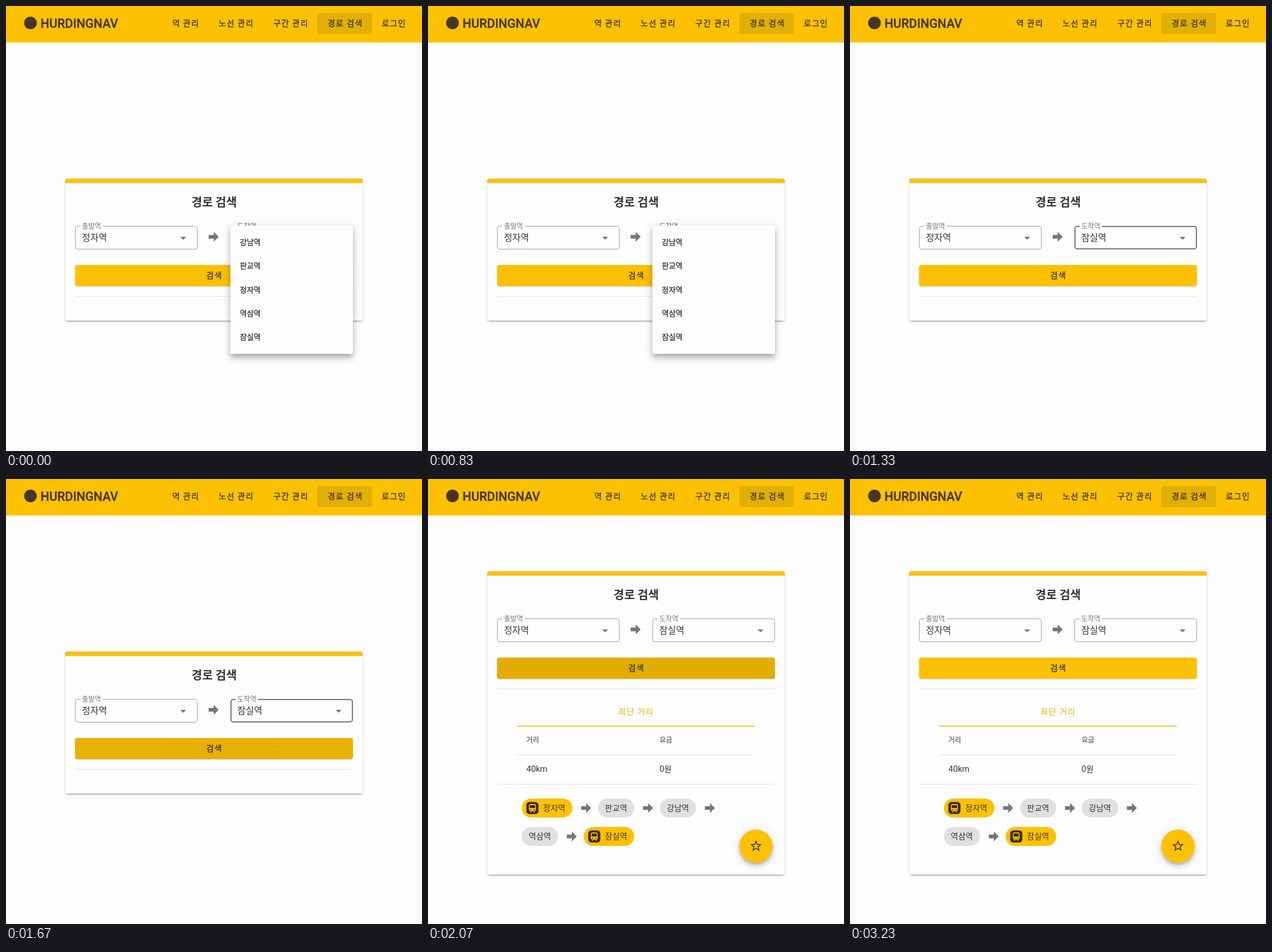
An HTML page with a canvas that plays this animation: 723 px wide and 775 px high, repeating every 3260 ms.

```html
<!DOCTYPE html>
<html lang="ko">
<head>
<meta charset="utf-8">
<title>경로 검색</title>
<style>
  html, body { margin: 0; width: 100%; height: 100%; overflow: hidden; background: #fdfdfd; }
  canvas { display: block; width: 723px; height: 775px; }
</style>
</head>
<body>
<canvas id="stage"></canvas>
<script>
const W = 723, H = 775, LOOP = 3260;
const AMBER = '#fcc102', DARK = '#463720', INK = '#333', GREY = '#777', PAPER = '#fdfdfd';
const FONT = 'Roboto, "Noto Sans CJK KR", "Noto Sans CJK", sans-serif';

// moments of the interaction, in ms
const PICK = 945, HOVER = 1370, PRESS = 1645, RESULT = 1860, LEAVE = 2320;

const canvas = document.getElementById('stage');
const ctx = canvas.getContext('2d');
const dpr = window.devicePixelRatio || 1;
canvas.width = W * dpr;
canvas.height = H * dpr;

const arrowIcon = new Path2D('M4,15V9H12V4.16L19.84,12L12,19.84V15H4Z');
const caretIcon = new Path2D('M7,10L12,15L17,10Z');
const starIcon = new Path2D('M12,15.39L8.24,17.66L9.23,13.38L5.91,10.5L10.29,10.13L12,6.09L13.71,10.13L18.09,10.5L14.77,13.38L15.76,17.66M22,9.24L14.81,8.63L12,2L9.19,8.63L2,9.24L7.45,13.97L5.82,21L12,17.27L18.18,21L16.54,13.97L22,9.24Z');

const clamp = v => Math.max(0, Math.min(1, v));
const ramp = (t, start, length) => clamp((t - start) / length);

// cubic-bezier(.25, .8, .5, 1)
function ease(x) {
  let lo = 0, hi = 1;
  for (let i = 0; i < 20; i++) {
    const s = (lo + hi) / 2, r = 1 - s;
    if (0.75 * r * r * s + 1.5 * r * s * s + s ** 3 < x) lo = s; else hi = s;
  }
  const r = 1 - lo;
  return 2.4 * r * r * lo + 3 * r * lo * lo + lo ** 3;
}

function box(x, y, w, h, r, fill) {
  ctx.beginPath();
  ctx.roundRect(x, y, w, h, r);
  ctx.fillStyle = fill;
  ctx.fill();
}

function disc(x, y, r, fill) {
  ctx.beginPath();
  ctx.arc(x, y, r, 0, Math.PI * 2);
  ctx.fillStyle = fill;
  ctx.fill();
}

// medium weight is thickened by a hairline, as Hangul has only regular and bold
function text(str, x, midY, size, color, weight = 400, spacing = 0) {
  const y = midY + size * 0.365;
  ctx.font = `${weight} ${size}px ${FONT}`;
  ctx.letterSpacing = spacing + 'px';
  ctx.fillStyle = ctx.strokeStyle = color;
  ctx.fillText(str, x, y);
  if (weight === 500) {
    ctx.lineWidth = 0.35;
    ctx.strokeText(str, x, y);
  }
}

function icon(path, cx, cy, color, scale = 1, angle = 0) {
  ctx.save();
  ctx.translate(cx, cy);
  ctx.rotate(angle);
  ctx.scale(scale, scale);
  ctx.translate(-12, -12);
  ctx.fillStyle = color;
  ctx.fill(path);
  ctx.restore();
}

// drop shadow outside a rounded box; layers are [dy, blur, spread, alpha]
function shadow(x, y, w, h, r, layers) {
  ctx.save();
  ctx.beginPath();
  ctx.rect(0, 0, W, H);
  ctx.roundRect(x, y, w, h, r);
  ctx.clip('evenodd');
  for (const [dy, blur, spread, alpha] of layers) {
    ctx.shadowColor = `rgba(0,0,0,${alpha})`;
    ctx.shadowBlur = blur * dpr;
    ctx.shadowOffsetX = 2000 * dpr;
    ctx.shadowOffsetY = dy * dpr;
    box(x - spread - 2000, y - spread, w + 2 * spread, h + 2 * spread, r, '#000');
  }
  ctx.restore();
}

const FAINT = [[1, 2, 0, 0.14]];
const LOW = [[3, 1, -2, 0.2], [2, 2, 0, 0.14], [1, 5, 0, 0.12]];
const MID = [[3, 5, -1, 0.2], [6, 10, 0, 0.14], [1, 18, 0, 0.12]];
const HIGH = [[5, 5, -3, 0.2], [8, 10, 1, 0.14], [3, 14, 2, 0.12]];

function header() {
  box(0, 0, W, 63.5, 0, AMBER);
  disc(42.5, 29.5, 11, DARK);
  text('HURDINGNAV', 60, 29.7, 21.4, DARK, 500);
  box(541, 12, 95, 37, 4, '#e2af04');
  const items = [['역 관리', 289], ['노선 관리', 369.5], ['구간 관리', 464.5], ['경로 검색', 559], ['로그인', 653]];
  for (const [label, x] of items) text(label, x, 29.5, 14, DARK, 500, 1.25);
}

function field(x, label, value, focused, angle) {
  const inset = focused ? 1 : 0.5;
  ctx.beginPath();
  ctx.roundRect(x + inset, 383 + inset, 213 - 2 * inset, 41 - 2 * inset, 4);
  ctx.strokeStyle = focused ? GREY : '#9e9e9e';
  ctx.lineWidth = 2 * inset;
  ctx.stroke();
  box(x + 9, 381, 39, 6, 0, PAPER);
  text(label, x + 12, 383.3, 12, GREY);
  text(value, x + 12, 403.2, 15.8, INK);
  icon(caretIcon, x + 188, 404, GREY, 1, angle);
}

function searchButton(t) {
  const shade = 0.08 * ramp(t, HOVER, 200) + 0.02 * ramp(t, PRESS + 80, 200);
  const out = 1 - ease(ramp(t, LEAVE, 200));
  shadow(120, 451, 483, 37, 4, FAINT);
  box(120, 451, 483, 37, 4, AMBER);
  box(120, 451, 483, 37, 4, `rgba(0,0,0,${shade * out})`);
  const ripple = ramp(t, PRESS, 260);
  if (ripple > 0 && t < PRESS + 400) {
    ctx.save();
    ctx.beginPath();
    ctx.roundRect(120, 451, 483, 37, 4);
    ctx.clip();
    const alpha = 0.05 * ripple * (1 - ramp(t, PRESS + 200, 200));
    disc(370, 470, 40 + 215 * ease(ripple), `rgba(66,52,32,${alpha})`);
    ctx.restore();
  }
  text('검색', 348, 469.2, 14, DARK, 500, 1.25);
}

function chip(x, y, label, terminal) {
  box(x, y, terminal ? 88 : 63, 33, 16.5, terminal ? AMBER : '#e0e0e0');
  text(label, x + (terminal ? 37 : 12), y + 16.2, 14, terminal ? DARK : INK);
  if (!terminal) return;
  const brown = '#38290f';
  box(x + 8, y + 6, 21, 21, 5.5, brown);
  box(x + 12.5, y + 9.5, 12, 12.5, 3, AMBER);
  box(x + 14, y + 11.5, 9, 5, 0.5, brown);
  for (const dx of [14.5, 20.5]) {
    box(x + dx, y + 18.5, 2, 2, 1, brown);
    box(x + dx, y + 22, 2, 2, 0, AMBER);
  }
}

function results() {
  text('최단 거리', 331, 405.3, 14, '#efc03c', 500, 1.25);
  box(155, 429.5, 413, 2, 0, '#f3c229');
  text('거리', 171, 455, 12, '#666', 500);
  text('요금', 402.5, 455, 12, '#666', 500);
  box(155, 480, 413, 1, 0, '#e2e2e2');
  text('40km', 171, 505, 14.6, INK);
  text('0원', 402.5, 505, 14.2, INK);
  box(120, 531, 483, 1, 0, '#e0e0e0');

  chip(163, 556.5, '정자역', true);
  chip(295.5, 556.5, '판교역');
  chip(403, 556.5, '강남역');
  chip(163, 606, '역삼역');
  chip(270.5, 606, '잠실역', true);
  for (const [x, y] of [[275, 573], [382.5, 573], [490, 573], [250, 622.5]])
    icon(arrowIcon, x, y, GREY, 1.1);

  shadow(541, 610.5, 58, 58, 29, MID);
  disc(570, 639.5, 29, AMBER);
  icon(starIcon, 570, 639, DARK);
}

// the shadow fades ahead of the panel
function menu(alpha) {
  if (alpha <= 0.005) return;
  ctx.save();
  ctx.globalAlpha = alpha * alpha;
  shadow(390, 382.5, 213, 223.5, 4, HIGH);
  ctx.globalAlpha = alpha;
  box(390, 382.5, 213, 223.5, 4, PAPER);
  ['강남역', '판교역', '정자역', '역삼역', '잠실역'].forEach((name, i) =>
    text(name, 406.5, 411.5 + 41.2 * i, 13, INK, 500));
  ctx.restore();
}

function draw(t) {
  ctx.setTransform(dpr, 0, 0, dpr, 0, 0);
  ctx.fillStyle = PAPER;
  ctx.fillRect(0, 0, W, H);
  header();

  const done = t >= RESULT;
  const top = done ? 160 : 300, height = done ? 529 : 248;
  const turn = ease(ramp(t, PICK, 300));
  shadow(103, top, 517, height, 4, LOW);
  box(103, top, 517, height, 4, PAPER);
  box(103, top + 0.5, 517, 8, [4, 4, 0, 0], '#f7c115');

  ctx.save();
  ctx.translate(0, top - 300);
  text('경로 검색', 322.5, 341.5, 20, INK, 700);
  field(120, '출발역', '정자역', false, 0);
  icon(arrowIcon, 361, 402, GREY, 1.1);
  field(390, '도착역', t >= PICK ? '잠실역' : '', t < PRESS + 40, Math.PI * (1 - turn));
  searchButton(t);
  box(120, 505, 483, 1, 0, '#e0e0e0');
  ctx.restore();

  if (done) results();
  menu(1 - ease(ramp(t, PICK, 250)));
}

const begin = performance.now();
function tick() {
  draw((performance.now() - begin) % LOOP);
  requestAnimationFrame(tick);
}
tick();
</script>
</body>
</html>
```
